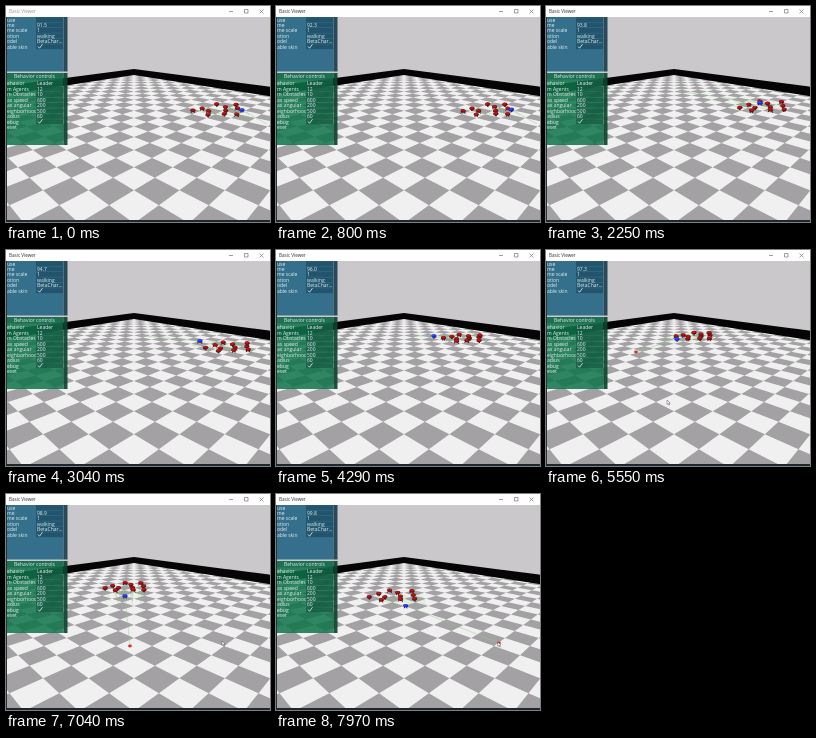
Recreate the animation shown at these times as an HTML page. Size 264 px wide and 216 px high, loop 8000 ms.

```html
<!DOCTYPE html>
<html lang="en">
<head>
<meta charset="utf-8">
<title>Basic Viewer</title>
<style>
html, body { margin: 0; width: 100%; height: 100%; overflow: hidden; background: #fff; }
svg { display: block; width: 264px; height: 216px; }
text { font-family: "Open Sans", "Noto Sans", sans-serif; font-size: 5px; }
</style>
</head>
<body>
<svg id="stage" viewBox="0 0 264 216" width="264" height="216"></svg>
<script>
const LOOP = 8000;
const svg = document.getElementById('stage');

function set(el, attrs) {
  for (const k in attrs) el.setAttribute(k, attrs[k]);
}
function add(tag, attrs, parent = svg) {
  const el = document.createElementNS('http://www.w3.org/2000/svg', tag);
  set(el, attrs);
  parent.appendChild(el);
  return el;
}
function label(x, y, str, fill = '#e4eef0') {
  const el = add('text', { x, y, fill });
  el.textContent = str;
  return el;
}

// Ground plane: far corner of the hall and the two vanishing points
const HORIZON = 29, TILE = 0.0225;
const corner = [128, 69], left = [-132, HORIZON], right = [388, HORIZON];
function ground(i, j) {
  const a = i * TILE, b = j * TILE, w = 1 - a - b;
  return [0, 1].map(n => ((corner[n] - a * left[n] - b * right[n]) / w).toFixed(2));
}

function drawRoom() {
  add('rect', { width: 264, height: 216, fill: '#cbc8cb' });
  add('path', { d: 'M128 69L394 110V300H-138V110Z', fill: '#f1f0f1' });
  let d = '';
  for (let m = 0; m < 40; m++) {
    for (let n = 0; m + n < 39; n++) {
      if ((m + n) % 2 === 0) continue;
      const i = m - 0.5, j = n - 0.5;
      d += 'M' + [ground(i, j), ground(i + 1, j), ground(i + 1, j + 1), ground(i, j + 1)].join('L') + 'Z';
    }
  }
  add('path', { d, fill: '#a3a1a3' });
  // The sky and wall cover the half tiles behind the far edges
  add('path', { d: 'M-2 80L128 63L266 81V60H-2Z', fill: '#cbc8cb' });
  add('path', { d: 'M-2 80L128 63L266 81V90.5L128 69L-2 89Z', fill: '#050505' });
}

// Rows are [label, value]; the value true means a ticked box
function drawRows(rows, top, step, field) {
  return rows.map(([name, value], n) => {
    const y = top + n * step;
    label(1, y, name);
    if (value === undefined) return null;
    add('rect', { x: 30, y: y - 4.3, width: 27, height: 4.9, fill: field, opacity: 0.7 });
    if (value !== true) return label(31, y, value);
    add('path', { d: `M32 ${y - 2}l1.5 1.7l3-4`, fill: 'none', stroke: '#e4eef0', 'stroke-width': 0.8 });
    return null;
  });
}

function drawPanel(y, height, fill, edge, opacity) {
  add('rect', { x: 0, y, width: 57.5, height, fill, opacity });
  add('rect', { x: 57.5, y, width: 4, height, fill: edge, opacity: 0.92 });
}

function drawPanels() {
  drawPanel(11, 54.5, '#246684', '#1b3f50', 0.9);
  const rows = drawRows([['use', ''], ['me', '91.5'], ['me scale', '1'], ['otion', 'walking'],
    ['odel', 'BetaChar...'], ['able skin', true]], 15.5, 5.4, '#1c4a62');
  drawPanel(67, 72, '#0f744b', '#0f4630', 0.85);
  add('rect', { x: 0, y: 67, width: 57.5, height: 6.5, fill: '#126048', opacity: 0.5 });
  label(8, 71.8, 'Behavior controls');
  drawRows([['ehavior', 'Leader'], ['m Agents', '12'], ['m Obstacles', '10'], ['ax speed', '600'],
    ['ax angular', '200'], ['eighborhood', '500'], ['adius', '60'], ['ebug', true], ['eset']],
    79.4, 5.45, '#145640');
  return rows[1];
}

function drawWindow() {
  add('rect', { width: 264, height: 11, fill: '#fefefe' });
  const title = label(3, 7.2, 'Basic Viewer');
  title.style.fontSize = '4.6px';
  add('path', {
    d: 'M223 5.5h4M238.5 3.5h3.5v3.5h-3.5zM253.5 3.5l4 4M257.5 3.5l-4 4',
    fill: 'none', stroke: '#777', 'stroke-width': 0.7
  });
  add('rect', { x: 0, y: 11, width: 1, height: 205, fill: '#26343a' });
  add('rect', { x: 0, y: 214, width: 264, height: 2, fill: '#1d292c' });
  return title;
}

// Routes are way points [time, x, y], walked at an even pace
const leadRoute = [[0, 236, 104], [1430, 235, 103], [3040, 194, 91], [4290, 158, 86],
  [5550, 131, 89], [7040, 119, 102], [LOOP, 130, 112]];
const flockRoute = [[0, 213, 104], [1430, 213, 104], [3040, 223, 97], [4290, 188, 88],
  [5550, 150, 86], [7040, 121, 93], [LOOP, 118, 102]];
const cursorRoute = [[4500, 90, 102], [5300, 121, 150], [6200, 121, 150], [6900, 216, 147],
  [7300, 216, 147], [LOOP, 222, 148]];
// Goals jump when clicked
const goals = [[0, 261, 118], [1300, 138, 86], [4300, 90, 102], [5900, 124, 152], [7250, 223, 149]];

function along(route, t) {
  const n = Math.max(1, route.findIndex(p => p[0] >= t));
  const [t0, x0, y0] = route[n - 1], [t1, x1, y1] = route[n];
  const u = Math.max(0, (t - t0) / (t1 - t0));
  return [x0 + (x1 - x0) * u, y0 + (y1 - y0) * u];
}

// A sunflower disc on the ground; its size on screen follows from the depth
const FLOCK = 11;
function member(n, [x, y], t) {
  const r = Math.sqrt((n + 0.7) / FLOCK), a = n * 2.4 + 0.3 + 0.12 * Math.sin(t / 900 + n);
  const depth = y - HORIZON;
  return [x + 0.37 * depth * r * Math.cos(a), y + 0.00125 * depth * depth * r * Math.sin(a)];
}

function makeWalker(body, dark) {
  const g = add('g', {});
  const legs = add('path', { fill: 'none', stroke: '#321818', 'stroke-width': 0.9 }, g);
  add('ellipse', { rx: 2.7, ry: 1.8, fill: dark }, g);
  add('ellipse', { cx: -0.3, cy: -0.5, rx: 2, ry: 1.1, fill: body }, g);
  return { g, legs };
}
function place(w, [x, y], t, n) {
  const s = Math.sin(t / 150 + n * 1.7);
  set(w.g, { transform: `translate(${x.toFixed(2)} ${y.toFixed(2)}) rotate(${(s * 7).toFixed(1)})` });
  set(w.legs, { d: `M-1 1l${(-1.5 * s).toFixed(2)} 1.6M1 1l${(1.5 * s).toFixed(2)} 1.6` });
}

drawRoom();
const feelers = add('path', { fill: 'none', stroke: '#7fcf70', 'stroke-width': 0.7, opacity: 0.5 });
const aim = add('path', { fill: 'none', stroke: '#86cf86', 'stroke-width': 0.6, opacity: 0.75 });
const mark = add('ellipse', { rx: 1.9, ry: 1.4, fill: '#e02c2c' });
const flock = Array.from({ length: FLOCK }, () => makeWalker('#b8181a', '#6c1012'));
const leader = makeWalker('#2a48ff', '#1420c8');
const clock = drawPanels();
const title = drawWindow();
const cursor = add('path', {
  d: 'M0 0v4.4l1.1-1l.8 1.7l.7-.3l-.8-1.7h1.4z', fill: '#fff', stroke: '#333', 'stroke-width': 0.4
});

function render(t) {
  const lead = along(leadRoute, t), mid = along(flockRoute, t);
  const [, gx, gy] = goals.filter(p => p[0] <= t).pop();
  let d = '';
  flock.forEach((w, n) => {
    const [x, y] = member(n, mid, t);
    const dx = gx - x, dy = gy - y, k = 14 / Math.max(14, Math.hypot(dx, dy));
    place(w, [x, y], t, n);
    d += `M${x.toFixed(1)} ${y.toFixed(1)}l${(dx * k).toFixed(1)} ${(dy * k).toFixed(1)}`;
  });
  set(feelers, { d });
  place(leader, lead, t, 0);
  set(aim, { d: `M${lead}L${gx} ${gy}` });
  set(mark, { cx: gx, cy: gy, opacity: t < 4300 ? 0 : 1 });
  set(cursor, { transform: `translate(${along(cursorRoute, t)})`, opacity: t > 4500 ? 1 : 0 });
  clock.textContent = (91.46 + t * 0.00105).toFixed(1);
  set(title, { fill: t < 170 ? '#999' : '#333' });
}

function frame() {
  render(performance.now() % LOOP);
  requestAnimationFrame(frame);
}
frame();
</script>
</body>
</html>
```
